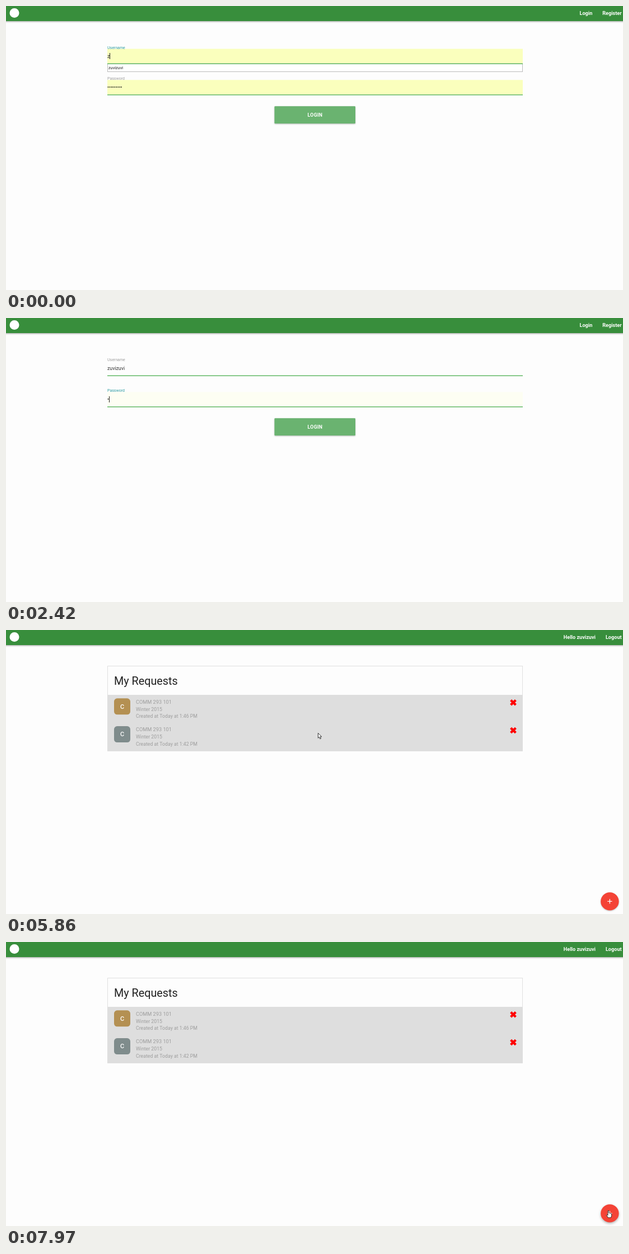
These frames come from a looping animation (1102x508 px, 8000 ms). An HTML page:

```html
<!DOCTYPE html>
<html lang="en">
<head>
<meta charset="utf-8">
<title>Sign in and requests</title>
<style>
  html, body { margin: 0; width: 100%; height: 100%; overflow: hidden; background: #fdfdfd; }
  svg { display: block; width: 1102px; height: 508px; font-family: Roboto, sans-serif; }
  .nav { font-size: 9.15px; font-weight: 700; fill: #fff; }
  .label { font-size: 7px; }
  .value { font-size: 8.75px; fill: #333; }
  .meta { font-size: 8.75px; fill: #9e9e9e; }
  .course { font-size: 9.2px; }
  .line { fill: #4caf50; }
  .bar { filter: drop-shadow(0 1px 1.5px rgba(0,0,0,.36)); }
  .low { filter: drop-shadow(0 1px .8px rgba(0,0,0,.25)); }
  .high { filter: drop-shadow(0 2px 2px rgba(0,0,0,.3)); }
</style>
</head>
<body>
<svg viewBox="0 0 1102 508">
  <defs>
    <clipPath id="buttonClip"><rect x="479.5" y="179.3" width="144.5" height="31" rx="1.3"/></clipPath>
    <path id="cross" d="M-4.4-4.3 4.4 4.3M4.4-4.3-4.4 4.3" stroke="#f00" stroke-width="4.2"/>
  </defs>

  <rect class="bar" x="-5" y="-5" width="1112" height="32" fill="#388e3c"/>
  <circle cx="15" cy="12.5" r="8.5" fill="#fff"/>

  <g id="loginPage">
    <text class="nav" x="1024.5" y="16">Login</text>
    <text class="nav" x="1099.6" y="16" text-anchor="end">Register</text>

    <rect id="userFill" x="181" y="76.6" width="742" height="26" fill="#faffbd"/>
    <text class="label" id="userLabel" x="181" y="76.6">Username</text>
    <text class="value" id="userText" x="181" y="93"></text>
    <g id="suggest">
      <rect x="181.5" y="103.5" width="741" height="14" fill="#fff" stroke="#bbb"/>
      <text x="183" y="113.2" font-size="7.1" font-family="Open Sans, sans-serif" class="name"></text>
    </g>
    <rect class="line" x="181" y="102.6" width="742" height="1.3"/>

    <rect id="passFill" x="181" y="132.3" width="742" height="26" fill="#faffbd"/>
    <rect class="line" x="181" y="158.3" width="742" height="1.3"/>
    <text class="label" id="passLabel" x="181" y="132.3">Password</text>
    <rect id="selection" x="181" y="140" width="26.5" height="11" fill="#3399ff"/>
    <text class="value" id="passText" x="181" y="148.3"></text>
    <rect id="caret" width="1" height="11" fill="#222"/>

    <rect id="button" x="479.5" y="179.3" width="144.5" height="31" rx="1.3" fill="#6ab370"/>
    <g clip-path="url(#buttonClip)"><circle id="ripple" cx="557" cy="189" fill="#fff" opacity=".23"/></g>
    <text x="551.9" y="198.4" text-anchor="middle" font-size="8.75" font-weight="700"
      letter-spacing=".32" fill="#fff">LOGIN</text>
  </g>

  <g id="requestPage">
    <text class="nav" x="1053" y="16" text-anchor="end">Hello <tspan class="name"></tspan></text>
    <text class="nav" x="1099.6" y="16" text-anchor="end">Logout</text>
    <rect x="181.5" y="64.5" width="741" height="152" fill="#fdfdfd" stroke="#e0e0e0"/>
    <text x="193" y="98" font-size="19.8" fill="#212121">My Requests</text>
    <rect x="181" y="116" width="742" height="100.7" fill="#dedede"/>
    <g id="rows"></g>
    <circle id="add" cx="1078.4" cy="485.4" r="16.2" fill="#f44336"/>
    <path d="M1074.3 485.4h8.2M1078.4 481.3v8.2" stroke="#fff" stroke-width="1.3"/>
  </g>

  <g id="cursor" stroke="#222" stroke-width=".9" stroke-linejoin="round" fill="#fff">
    <path id="arrow" d="M.4.4V9.3L2.5 7.4 3.9 10.8 5.5 10.1 4.1 6.9H6.8Z"/>
    <path id="hand" d="M-1 9V1Q0-.5 1 1V5Q2.2 4 2.8 5.4 4 4.6 4.4 6 5.6 5.4 5.6 7V10L4.4 13H-.6L-3.6 8.6Q-3.6 6.8-1 9Z"/>
  </g>
</svg>

<script>
const LOOP = 8000, NAME = 'zuvizuvi';
const POINTER_START = 4620, POINTER_STEP = 138, PAGE_CHANGE = 5740;

const $ = id => document.getElementById(id);
const show = (id, on) => $(id).setAttribute('visibility', on ? 'inherit' : 'hidden');
const set = (id, attrs) => {
  for (const key in attrs) $(id).setAttribute(key, attrs[key]);
};
const clamp = (v, lo, hi) => Math.min(hi, Math.max(lo, v));
const lerp = (a, b, p) => a + (b - a) * p;

// Counts up by one at `start` and then every `gap` ms, to at most `n`.
const count = (t, start, gap, n) => clamp(Math.floor((t - start) / gap) + 1, 0, n);
const tint = (t, start) => (1 - count(t, start, 120, 3) / 3) ** 1.6;
const half = (t, start) => count(t, start, 120, 2) / 2;

const lettersAt = t => 1 + count(t, 120, 1, 1) + count(t, 520, 1, 2) + count(t, 800, 130, 4);
const dotsAt = t => t < 2300 ? 9 : 1 + count(t, 2700, 150, 4) + count(t, 3430, 170, 4);

// Turning points of the pointer: time, x, y.
const path = [
  [4620, 600, 2], [5172, 557, 184], [5724, 557, 184], [6000, 591, 184],
  [6690, 261, 138], [7794, 1074, 494], [7932, 1076, 480]
];

function pointerAt(t) {
  const i = path.findLastIndex(point => point[0] <= t);
  const [t0, x0, y0] = path[i], [t1, x1, y1] = path[i + 1] || [LOOP, x0, y0];
  const p = (t - t0) / (t1 - t0), eased = p * p * (3 - 2 * p);
  return [lerp(x0, x1, eased), lerp(y0, y1, eased)];
}

const labelColor = focus => {
  const mix = (a, b) => Math.round(lerp(a, b, focus));
  return `rgb(${mix(158, 45)},${mix(158, 156)},${mix(158, 160)})`;
};

const row = (y, color, time) => `<g transform="translate(0 ${y})">
  <rect x="193" y="122.3" width="29" height="29" rx="5.5" fill="${color}"/>
  <text x="207.5" y="140.6" text-anchor="middle" font-size="11" font-weight="500" fill="#fff">C</text>
  <text class="meta course" x="232" y="131.7">COMM 293 101</text>
  <text class="meta" x="232" y="144.5">Winter 2015</text>
  <text class="meta" x="232" y="157.3">Created at Today at ${time}</text>
  <use href="#cross" x="906" y="129.7"/></g>`;

$('rows').innerHTML = row(0, '#b49052', '1:46 PM') + row(49.8, '#7f8c8c', '1:42 PM');
document.querySelectorAll('.name').forEach(el => el.textContent = NAME);

function drawForm(t) {
  const inUser = t < 1620, selected = !inUser && t < 2300;
  const moved = half(t, 1620);
  $('userText').textContent = NAME.slice(0, lettersAt(t));
  $('passText').textContent = '•'.repeat(dotsAt(t));
  $('passText').style.fill = selected ? '#fff' : '#111';
  set('userFill', { opacity: tint(t, 120) });
  set('passFill', { opacity: tint(t, 2300) });
  set('userLabel', { fill: labelColor(1 - moved) });
  set('passLabel', { fill: labelColor(moved - half(t, 5310)) });
  show('suggest', inUser);
  show('selection', selected);

  const field = $(inUser ? 'userText' : 'passText');
  set('caret', { x: Math.round(180.7 + field.getComputedTextLength()), y: inUser ? 84 : 140 });
  show('caret', !selected && t < 4350);

  const waves = count(t, 5310, POINTER_STEP, 3);
  set('ripple', { r: waves && 13 + 33 * waves });
}

function drawPointer(t, onLogin) {
  const visible = t >= POINTER_START;
  const step = Math.floor((t - POINTER_START) / POINTER_STEP);
  const [x, y] = visible ? pointerAt(POINTER_START + step * POINTER_STEP) : [0, 0];
  const overButton = onLogin && y > 179;
  const overAdd = !onLogin && Math.hypot(x - 1078.4, y - 485.4) < 16.2;
  const hand = overButton || overAdd;
  show('cursor', visible);
  show('arrow', !hand);
  show('hand', hand);
  set('cursor', { transform: `translate(${x} ${y})` });
  set('button', { class: overButton ? 'high' : 'low' });
  set('add', { class: overAdd ? 'high' : 'low' });
}

function draw(t) {
  const onLogin = t < PAGE_CHANGE;
  show('loginPage', onLogin);
  show('requestPage', !onLogin);
  if (onLogin) drawForm(t);
  drawPointer(t, onLogin);
}

const start = performance.now();
function tick() {
  draw((performance.now() - start) % LOOP);
  requestAnimationFrame(tick);
}
tick();
</script>
</body>
</html>
```
